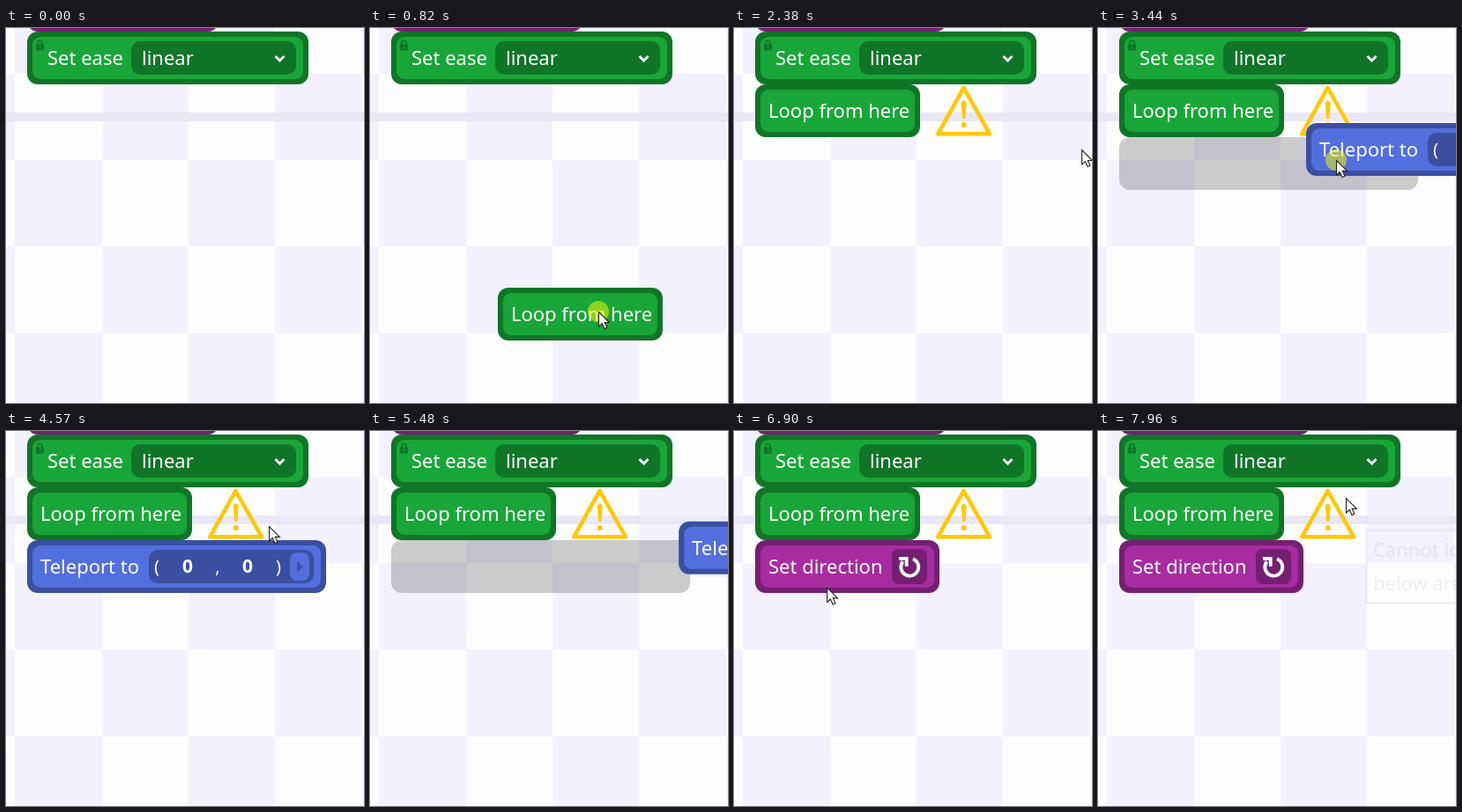
An HTML page that plays this animation: 406x426 px, repeating every 8000 ms.

```html
<!DOCTYPE html>
<html>
<head>
<meta charset="utf-8">
<title>Block dragging</title>
<style>
html, body { margin: 0; width: 100%; height: 100%; overflow: hidden; background: #fdfdfe; }
svg { display: block; }
text { font: 22px "Noto Sans", "Open Sans", sans-serif; fill: #fff; }
.mid { text-anchor: middle; font-size: 20px; }
.num { font-weight: 600; font-size: 21px; text-anchor: middle; }
#tip text { fill: #4a3a94; }
</style>
</head>
<body>
<svg id="stage" width="406" height="426" viewBox="0 0 406 426"></svg>
<script>
const GREEN = ['#18a638', '#107527'], BLUE = ['#536fde', '#3a4fa0'], PURPLE = ['#a62ca0', '#751f72'];
const CELL = 98.35, SLOT_X = 24, FRAME = 70, LOOP = 8000;

const rect = (x, y, w, h, r, fill) =>
  `<rect x="${x}" y="${y}" width="${w}" height="${h}" rx="${r}" fill="${fill}"/>`;
const label = (x, y, s, cls = '') => `<text x="${x}" y="${y}" class="${cls}">${s}</text>`;
const block = (id, x, y, w, [fill, dark], inner = '') =>
  `<g id="${id}" transform="translate(${x} ${y})">${rect(0, 0, w, 60, 12, dark)}${rect(6, 6, w - 12, 48, 9, fill)}${inner}</g>`;

function checkers() {
  let out = '';
  for (let row = 0; row < 5; row++)
    for (let col = -1; col < 5; col++)
      if ((row + col) % 2 === 0)
        out += rect(10.3 + col * CELL, -46.6 + row * CELL, CELL, CELL, 0, '#f3f1fd');
  return `<g shape-rendering="crispEdges">${out}</g>`;
}

const lock = `<path d="M12 15v-2a2.500 2.500 0 0 1 5 0v2" fill="none" stroke="${GREEN[1]}" stroke-width="1.700"/>
  ${rect(10, 14.5, 9, 7, 1, GREEN[1])}${rect(14, 16.5, 1.2, 3, 0, GREEN[0])}`;
const easeBlock = lock + label(23, 38, 'Set ease') + rect(118, 11, 187, 38, 10, GREEN[1]) + label(130, 38, 'linear') +
  '<path d="M281.500 28l5 5 5-5" fill="none" stroke="#fff" stroke-width="2.800"/>';
const teleportBlock = label(15, 38, 'Teleport to') + rect(138, 11, 187, 38, 10, BLUE[1]) +
  label(147, 37, '(', 'mid') + label(182, 37, '0', 'num') + label(216, 37, ',', 'mid') +
  label(250, 37, '0', 'num') + label(285, 37, ')', 'mid') +
  rect(298, 14, 22, 32, 8, BLUE[0]) + `<path d="M306 24l7 6-7 6z" fill="${BLUE[1]}"/>`;
const directionBlock = label(15, 38, 'Set direction') + rect(155, 10, 40, 40, 8, PURPLE[1]) +
  `<g fill="none" stroke="#fff" stroke-width="3.800"><path d="M179 21.300a10 10 0 1 1-11.500 3"/>
   <path d="M163 20.800h8.700v9"/></g>`;

document.getElementById('stage').innerHTML = `
  ${rect(0, 0, 406, 426, 0, '#fdfdfe')}${checkers()}${rect(0, 96, 406, 10, 0, '#eae7f6')}
  ${block('top', SLOT_X, -56, 217, PURPLE)}${block('ease', SLOT_X, 4, 319, GREEN, easeBlock)}
  <rect id="ghost" x="${SLOT_X}" height="60" rx="12" opacity=".2"/>
  <g id="warning" fill="#ffc800">
    <path d="M260.500 67.800L231.200 120.300h58.800z" fill="none" stroke="#ffc800" stroke-width="4.500" stroke-linejoin="round"/>
    <path d="M257.700 85q3-5.500 6 0l-1.300 18h-3.400z"/><circle cx="260.700" cy="110" r="3"/>
  </g>
  ${block('loop', SLOT_X, 64, 187, GREEN, label(15, 38, 'Loop from here'))}
  ${block('teleport', SLOT_X, 124, 339, BLUE, teleportBlock)}
  ${block('direction', SLOT_X, 124, 209, PURPLE, directionBlock)}
  <g id="tip">
    <rect x="304.500" y="113" width="200" height="82.500" fill="#fff" stroke="#8a7cc8" stroke-width="3"/>
    ${label(312, 143, 'Cannot loop')}${label(312, 181, 'below area')}
  </g>
  <g id="cursor">
    <circle id="press" r="12" fill="#ff0" opacity=".5"/>
    <path d="M.500.500v16.500l3.800-3.500 2.700 6 2.900-1.200-2.700-5.900h5.200z" fill="#fff" stroke="#222" stroke-width="1.100"/>
  </g>`;

const easeOut = k => 1 - (1 - k) ** 2;
const easeInOut = k => k * k * (3 - 2 * k);
const drag = (id, from, time, a, b, slot, width, grip, ease = easeOut) =>
  ({ id, from, time, a, b, slot, width, grip, ease });
const glide = (from, time, a, b, ease = easeInOut) => ({ from, time, a, b, ease });

// Each act lasts until the next; a drag carries its block, a glide only the cursor
const acts = [
  drag('loop', 680, 700, [209, 406], [31, 98], 64, 187, [114, 27]),
  glide(1780, 1, [145, 125], [145, 125]),
  glide(2200, 180, [145, 125], [430, 140]),
  drag('teleport', 3310, 490, [428, 84], [36, 133], 124, 339, [34, 42]),
  glide(3800, 350, [70, 176], [142, 166]),
  glide(4150, 420, [142, 166], [298, 108]),
  glide(4570, 350, [298, 108], [150, 154]),
  { ...drag('teleport', 4990, 700, [24, 124], [440, 97], 124, 339, [126, 30], easeInOut), leaves: true },
  drag('direction', 6420, 420, [338, 101], [36, 136], 124, 209, [54, 43]),
  glide(6840, 340, [90, 179], [228, 165]),
  glide(7180, 420, [228, 165], [281, 76])
];

const $ = id => document.getElementById(id);
const show = (id, on) => { $(id).style.display = on ? '' : 'none'; };
const move = (id, x, y) => $(id).setAttribute('transform', `translate(${x.toFixed(1)} ${y.toFixed(1)})`);
const clamp = k => Math.max(0, Math.min(1, k));

function place(act, t) {
  const elapsed = Math.floor((t - act.from + 10) / FRAME) * FRAME;
  const k = act.ease(clamp(elapsed / act.time));
  return act.a.map((v, i) => v + (act.b[i] - v) * k);
}

function draw(t) {
  const past = acts.filter(a => a.from <= t);
  const act = past[past.length - 1];
  const [x, y] = act ? place(act, t) : [500, 500];
  const dragging = Boolean(act && act.id);

  for (const id of ['loop', 'teleport', 'direction']) {
    const last = past.filter(a => a.id === id).pop();
    show(id, last && (last === act || !last.leaves));
    if (last === act) move(id, x, y);
    else if (last) move(id, SLOT_X, last.slot);
  }

  const [gx, gy] = dragging ? act.grip : [0, 0];
  move('cursor', x + gx, y + gy);
  show('press', dragging);
  show('ghost', dragging && Math.abs(y - act.slot) < 120 && x < 430);
  if (dragging) {
    $('ghost').setAttribute('y', act.slot);
    $('ghost').setAttribute('width', act.width);
  }
  show('warning', t >= 1780);
  $('tip').setAttribute('opacity', 0.08 * clamp((t - 7740) / 210));
}

const begin = performance.now();
function tick() {
  draw((performance.now() - begin) % LOOP);
  requestAnimationFrame(tick);
}
tick();
</script>
</body>
</html>
```
